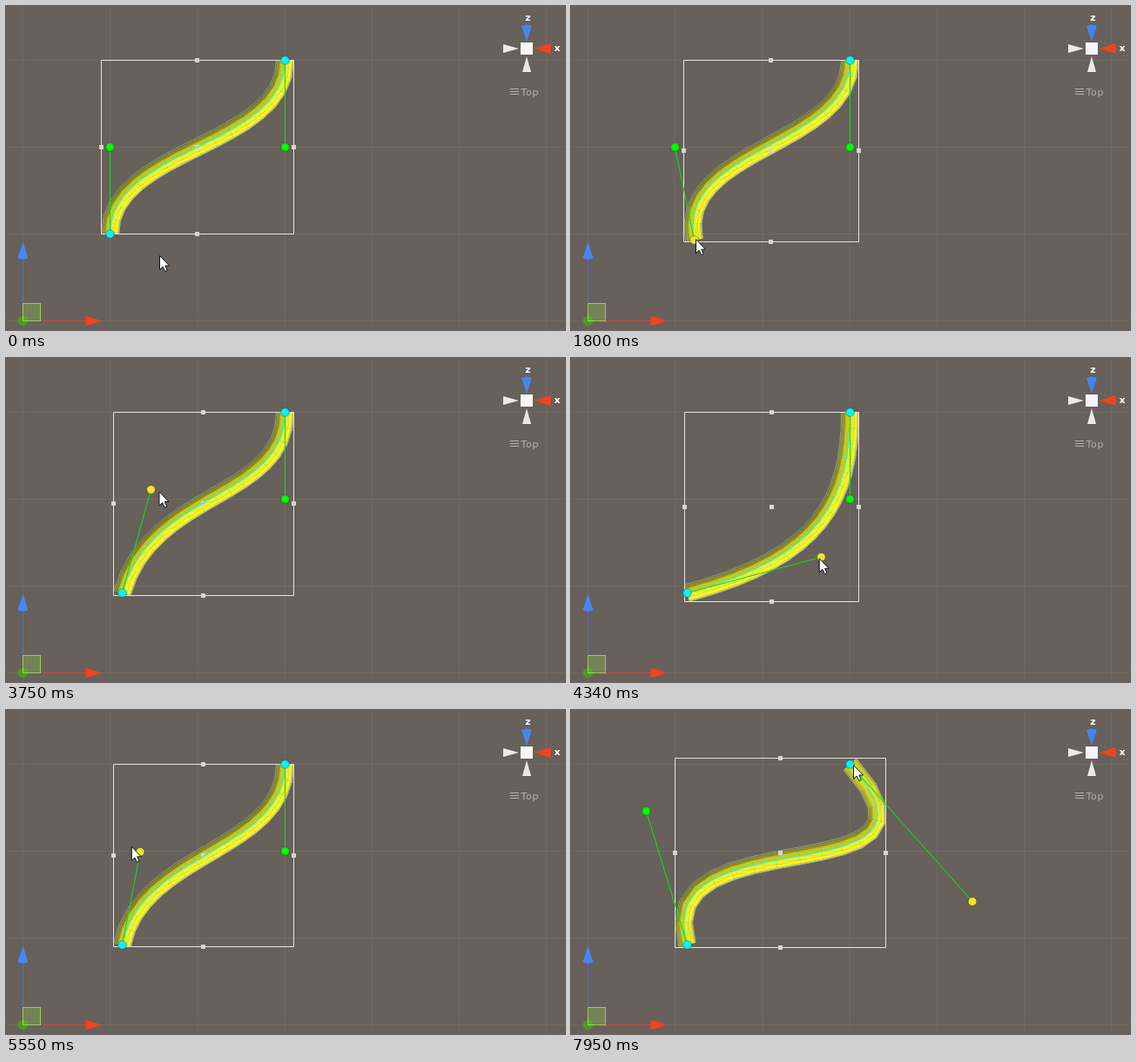
An HTML page with a canvas for the animation above (8000 ms loop, 642 by 373 pixels).

```html
<!DOCTYPE html>
<html lang="en">
<head>
<meta charset="utf-8">
<title>Bezier tube editing</title>
<style>
html, body { margin: 0; width: 100%; height: 100%; overflow: hidden; background: #67605b; }
svg, canvas { position: absolute; left: 0; top: 0; }
text { font-family: "DejaVu Sans", sans-serif; font-size: 11px; }
</style>
</head>
<body>
<svg width="642" height="373">
  <defs>
    <pattern id="grid" x="19" y="62" width="100.200" height="100" patternUnits="userSpaceOnUse">
      <path d="M.5 0V100M0 .5H101" stroke="#84908a" stroke-opacity=".22"/>
    </pattern>
  </defs>
  <rect width="642" height="373" fill="url(#grid)"/>
  <!-- move axes -->
  <circle cx="19.500" cy="362.500" r="6" fill="#4b9a22"/>
  <path d="M19.500 362V290" stroke="#4a74c8"/>
  <path d="M20 362.500H93" stroke="#d9432a"/>
  <path d="M19.500 272L25.500 290Q19.500 293 13.500 290Z" fill="#4a86f4"/>
  <path d="M110 362.500L92 368.500Q90.500 362.500 92 356.500Z" fill="#f1431f"/>
  <rect x="19.500" y="342.500" width="20" height="20" fill="#8fc04a" fill-opacity=".35" stroke="#9ccb50"/>
  <!-- view gizmo -->
  <path d="M598 41L592 23Q598 20 604 23Z" fill="#4285f0"/>
  <path d="M607 49L625 43Q627 49 625 55Z" fill="#f1431f"/>
  <path d="M589 49L571 44V54ZM598 58L593 76H603Z" fill="#e9e9e8"/>
  <rect x="591" y="42" width="14" height="14" fill="#f6f6f5"/>
  <g fill="#fff" font-weight="bold" text-anchor="middle"><text x="599.500" y="17">z</text><text x="633" y="52">x</text></g>
  <path d="M579 95.500h10M579 98.500h10M579 101.500h10" stroke="#b4b1ae"/>
  <text x="591.500" y="103" fill="#b4b1ae" letter-spacing=".7">Top</text>
</svg>
<canvas id="stage" width="642" height="373"></canvas>
<script>
const ctx = document.getElementById('stage').getContext('2d');
const LOOP = 8000, STEP = 148, LEAD = 28;
const RINGS = 16, STRIPS = 6, RADIUS = 10;
const END = [320, 62];

// The picture only advances during these spans, one step at a time
const bursts = [[130, 1200], [1640, 2680], [2820, 3290], [3750, 4030], [4340, 4790],
  [5100, 5990], [6150, 7030], [7210, 7490], [7800, 7950]];

function snap(t) {
  const [a, b] = bursts.filter(span => span[0] <= t).pop() || [0, 0];
  if (t >= b) return b;
  const step = (b - a) / Math.round((b - a) / STEP);
  return a + step * Math.floor((t - a) / step + 0.1);
}

const ease = f => 1 - (1 - f) ** 1.4;
const add = (p, x, y) => [p[0] + x, p[1] + y];

// Runs through moves of the form [from, to, point]
function travel(t, p, ...moves) {
  for (const [from, to, q] of moves) {
    const f = ease(Math.min(1, Math.max(0, (t - from) / (to - from))));
    p = add(p, (q[0] - p[0]) * f, (q[1] - p[1]) * f);
  }
  return p;
}

function handles(t) {
  return [
    travel(t, [119, 262], [436, 1047, [141, 251]], [1640, 1789, [141, 269]], [1789, 2086, [133, 270]]),
    travel(t, [119, 162], [2680, 3290, [43, 97]], [3290, 3750, [166, 151]], [3750, 4030, [264, 184]],
      [4030, 4790, [308, 270]], [4950, 5990, [86, 116]]),
    travel(t, [320, 162], [6583, 6883, [460.5, 220]])
  ];
}

// The pointer glides to each handle, then stays on it slightly ahead of the drag
function pointer(t) {
  const [a, b, c] = handles(t + LEAD);
  return travel(t, [176, 287], [0, 436, add(a, 3, -1)], [2234, 2680, add(b, -4, -2)], [5990, 6443, add(c, 0, 3)],
    [6883, 7490, [313, 51]], [7490, 7950, [324, 63]]);
}

function trace(points, close) {
  ctx.beginPath();
  points.forEach(p => ctx.lineTo(p[0], p[1]));
  if (close) ctx.closePath();
}

function stroke(color, width = 1) {
  ctx.strokeStyle = color;
  ctx.lineWidth = width;
  ctx.stroke();
}

function line(points, color, width) {
  trace(points);
  stroke(color, width);
}

// Rings of points across the visible half of the tube, with the side normal of each ring
function buildTube(a, b, c, d) {
  return Array.from({ length: RINGS + 1 }, (_, i) => {
    const t = i / RINGS, s = 1 - t;
    const pos = k => s * s * s * a[k] + 3 * s * s * t * b[k] + 3 * s * t * t * c[k] + t * t * t * d[k];
    const vel = k => s * s * (b[k] - a[k]) + 2 * s * t * (c[k] - b[k]) + t * t * (d[k] - c[k]);
    const len = Math.hypot(vel(0), vel(1)), nx = -vel(1) / len, ny = vel(0) / len;
    const points = Array.from({ length: STRIPS + 1 }, (_, j) => {
      const u = -Math.cos(Math.PI * j / STRIPS) * RADIUS;
      return [pos(0) + nx * u, pos(1) + ny * u];
    });
    return { nx, ny, points };
  });
}

function drawTube(rings) {
  for (let i = 0; i < RINGS; i++) {
    const p = rings[i].points, q = rings[i + 1].points;
    const nx = (rings[i].nx + rings[i + 1].nx) / 2, ny = (rings[i].ny + rings[i + 1].ny) / 2;
    for (let j = 0; j < STRIPS; j++) {
      const angle = Math.PI * (j + 0.5) / STRIPS, u = -Math.cos(angle);
      const light = Math.min(1, 0.52 + 0.6 * (0.45 * u * (nx + ny) + 0.62 * Math.sin(angle)));
      ctx.fillStyle = `rgb(${255 * light},${254 * light},${30 * light})`;
      trace([p[j], p[j + 1], q[j + 1], q[j]], true);
      ctx.fill();
      stroke(ctx.fillStyle, 0.5);
    }
  }
  const wire = 'rgba(150,170,160,.42)';
  for (let j = 0; j <= STRIPS; j++) {
    const edge = j % STRIPS === 0;
    line(rings.map(r => r.points[j]), edge ? 'rgba(150,168,168,.9)' : wire, edge ? 1 : 0.7);
  }
  rings.forEach((r, i) => {
    line(r.points, wire, 0.7);
    if (i < RINGS) for (let j = 0; j < STRIPS; j++) line([r.points[j], rings[i + 1].points[j + 1]], wire, 0.6);
  });
}

function drawBounds(rings) {
  const all = rings.flatMap(r => r.points), xs = all.map(p => p[0]), ys = all.map(p => p[1]);
  const [l, r, t, b] = [Math.min(...xs), Math.max(...xs), Math.min(...ys), Math.max(...ys)].map(Math.round);
  const cx = Math.floor((l + r) / 2), cy = Math.floor((t + b) / 2);
  trace([[l, t], [r, t], [r, b], [l, b]], true);
  stroke('#e4e2e0');
  ctx.fillStyle = '#d6d4d1';
  for (const [x, y] of [[cx, t], [cx, b], [l, cy], [r, cy], [cx, cy]]) ctx.fillRect(x - 2.5, y - 2.5, 5, 5);
}

function drawKnob([x, y], color) {
  ctx.beginPath();
  ctx.arc(x, y, 4.8, 0, 7);
  ctx.fillStyle = color;
  ctx.fill();
  stroke('rgba(30,60,40,.6)', 0.7);
}

function drawPointer(p) {
  const shape = [[0, 0], [0, 16], [3.7, 12.6], [6.2, 18], [8.8, 17], [6.4, 11.5], [11, 11.5]];
  trace(shape.map(([x, y]) => add(p, x, y)), true);
  ctx.fillStyle = '#fff';
  ctx.fill();
  stroke('#111');
}

function draw(now) {
  const t = snap(now % LOOP);
  const [a, b, c] = handles(t);
  const active = t < 430 ? null : t < 2675 ? a : t < 6440 ? b : c;
  const knob = (p, color) => drawKnob(p, p === active ? '#f0e624' : color);
  const rings = buildTube(a, b, c, END);

  ctx.setTransform(1, 0, 0, 1, 0.5, 0.5);
  ctx.clearRect(-1, -1, 644, 375);
  drawTube(rings);
  drawBounds(rings);

  ctx.beginPath();
  ctx.moveTo(...a);
  ctx.bezierCurveTo(...b, ...c, ...END);
  stroke('#20f4e0', 1.2);
  line([a, b], '#14dc14', 1.1);
  line([END, c], '#14dc14', 1.1);
  knob(a, '#00f6f6');
  knob(END, '#00f6f6');
  knob(b, '#00f800');
  knob(c, '#00f800');
  drawPointer(pointer(t));
}

const begin = performance.now();
function tick() {
  draw(performance.now() - begin);
  requestAnimationFrame(tick);
}
tick();
</script>
</body>
</html>
```
